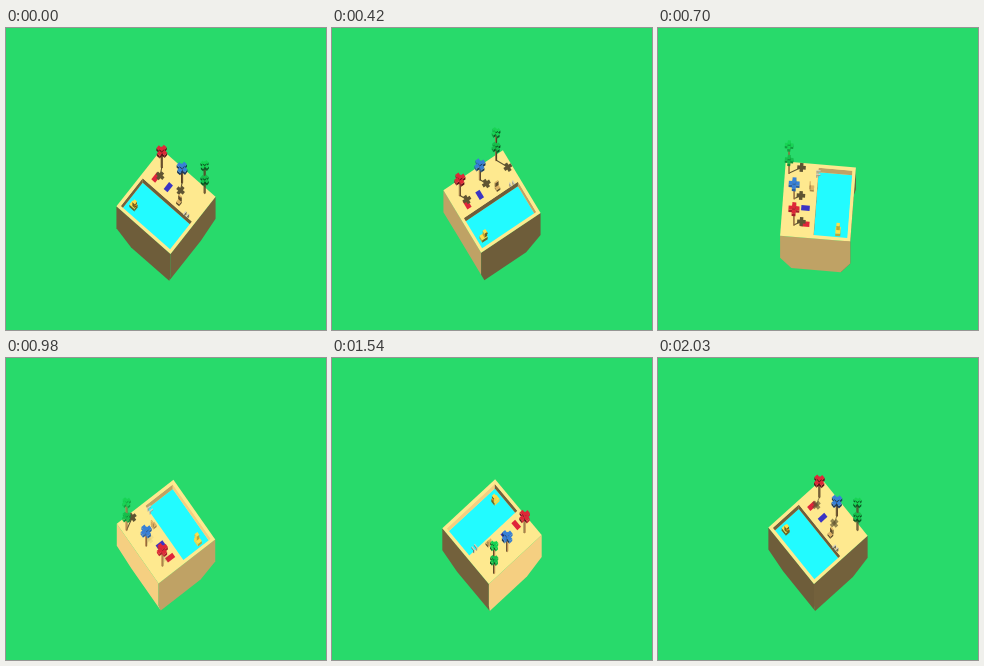
Recreate the animation shown at these times as an HTML page with a canvas. Size 320 px wide and 302 px high, loop 2100 ms.

```html
<!DOCTYPE html>
<html lang="en">
<head>
<meta charset="utf-8">
<title>Pool island</title>
<style>
html, body { margin: 0; width: 100%; height: 100%; overflow: hidden; background: #28da6b; }
canvas { display: block; }
</style>
</head>
<body>
<canvas id="stage" width="320" height="302"></canvas>
<script>
const ctx = document.getElementById('stage').getContext('2d');
const LOOP = 2100, STEP = 70, TILT = 1.055;
const TOP = '#fee98f', SAND = [255, 216, 134], WOOD = [196, 142, 80], SHADOW = '#5f5432';

// time in ms, turn in degrees
const TURN = [[0, -129.8], [420, -57.6], [700, -4.6], [980, 36.4],
  [1260, 84.9], [1540, 131.4], [2030, 220.4], [2100, 230.2]];

// Sides of a block: outward normal and fixed light level
const SIDES = [
  { n: [0, -1], light: 0.45 },
  { n: [1, 0], light: 0.43 },
  { n: [0, 1], light: 0.75 },
  { n: [-1, 0], light: 0.96 }
];
const CORNERS = [[-1, -1], [1, -1], [1, 1], [-1, 1]];
const POOL = { u0: -2, u1: 32, v0: -32, v1: 32, deep: 4.5 };

let angle = 0, cos = 1, sin = 0;

function turnAt(t) {
  const i = TURN.findIndex((k, n) => n > 0 && t <= k[0]);
  const [t0, a0] = TURN[i - 1], [t1, a1] = TURN[i];
  return a0 + (a1 - a0) * (t - t0) / (t1 - t0);
}

const depth = (u, v) => v * cos - u * sin;
const project = ([u, v, h = 0]) =>
  [160 + u * cos + v * sin, 173.6 + TILT * depth(u, v) - h];
const tint = (rgb, light) => `rgb(${rgb.map(c => Math.round(c * light)).join()})`;

function trace(points) {
  ctx.beginPath();
  points.forEach(p => ctx.lineTo(...project(p)));
  ctx.closePath();
}

function poly(points, fill) {
  trace(points);
  ctx.fillStyle = fill;
  ctx.fill();
}

const rect = (u, v, w, d, h = 0) =>
  CORNERS.map(([a, b]) => [u + a * w / 2, v + b * d / 2, h]);

function box({ u, v, h, w, d, t, rgb }) {
  const low = rect(u, v, w, d, h), high = rect(u, v, w, d, h + t);
  SIDES.forEach(({ n, light }, i) => {
    if (depth(...n) <= 0) return;
    const j = (i + 1) % 4;
    poly([high[i], high[j], low[j], low[i]], tint(rgb, light));
  });
  poly(high, tint(rgb, 1));
}

// Island body: a straight block with a tapered foot
function drawBody() {
  const top = rect(0, 0, 70.4, 70.4);
  const waist = rect(0, 0, 70.4, 70.4, -22);
  const foot = rect(0, 0, 49.5, 49.5, -42.5);
  SIDES
    .map((side, i) => ({ ...side, i, near: depth(...side.n) }))
    .filter(side => side.near > 0)
    .sort((a, b) => a.near - b.near)
    .forEach(({ i, light }) => {
      const j = (i + 1) % 4;
      poly([top[i], top[j], waist[j], foot[j], foot[i], waist[i]], tint(SAND, light));
    });
  poly(top, TOP);
}

function drawPool() {
  const { u0, u1, v0, v1, deep } = POOL;
  const rim = [[u0, v0], [u1, v0], [u1, v1], [u0, v1]];
  ctx.save();
  trace(rim);
  ctx.clip();
  poly(rim.map(p => [...p, -deep]), '#22fbff');
  SIDES.forEach(({ n }, i) => {
    if (depth(...n) >= 0) return;
    const a = rim[i], b = rim[(i + 1) % 4];
    poly([a, b, [...b, -deep], [...a, -deep]], tint(SAND, SIDES[(i + 2) % 4].light));
  });
  ctx.restore();
}

// shade: turn offset, in degrees, at which the shadow is strongest
const PALMS = [
  { u: -22.2, v: 24, tall: 17, rgb: [222, 40, 56], spread: 3.5, shade: 60 },
  { u: -24, v: -0.9, tall: 15.5, rgb: [56, 128, 214], spread: 3.5, shade: 60 },
  { u: -31, v: -24.5, tall: 28.5, rgb: [24, 212, 84], spread: 2.7, shade: 30, low: 14 }
];

function crown(u, v, h, rgb, r) {
  const leaf = (x, y, drop, size) =>
    ({ u: u + x, v: v + y, h: h - drop, w: size, d: size, t: 2.4, rgb });
  return [leaf(0, 0, 1, r), ...SIDES.map(({ n }) => leaf(n[0] * r, n[1] * r, 2.4, r * 1.1))];
}

function palmParts({ u, v, tall, rgb, spread, low }) {
  return [
    { u, v, h: 0, w: 1.5, d: 1.5, t: tall - 1, rgb: WOOD },
    ...crown(u, v, tall, rgb, spread),
    ...(low ? crown(u, v, low, rgb.map(c => c * 0.9), spread) : [])
  ];
}

function palmShadow({ u, v, tall, shade }) {
  const su = u + tall * 0.42, sv = v - tall * 0.225;
  const strength = 2 * Math.cos(angle + shade * Math.PI / 180) + 0.3;
  ctx.globalAlpha = Math.min(1, Math.max(0, strength));
  poly([[u, v - 0.6], [su, sv - 0.6], [su, sv + 0.6], [u, v + 0.6]], SHADOW);
  poly(rect(su, sv, 8.5, 3.4), SHADOW);
  poly(rect(su, sv, 3.4, 8.5), SHADOW);
  ctx.globalAlpha = 1;
}

const YELLOW = [255, 222, 74], STEEL = [214, 210, 190], SEAT = [222, 178, 100];
const PARTS = [
  ...PALMS.flatMap(palmParts),
  // duck
  { u: 22, v: 24, h: -4, w: 5, d: 6.5, t: 2.5, rgb: YELLOW },
  { u: 22, v: 22.4, h: -1.5, w: 3.4, d: 3.2, t: 4, rgb: YELLOW },
  { u: 22, v: 20.4, h: -0.5, w: 2, d: 1.2, t: 1, rgb: [240, 150, 40] },
  // chair
  { u: -7, v: -11, h: 0, w: 4, d: 4, t: 2, rgb: SEAT },
  { u: -8.8, v: -11, h: 2, w: 1.2, d: 4, t: 4, rgb: SEAT },
  // ladder
  ...[-26.5, -23].flatMap(v => [
    { u: -3, v, h: 0, w: 1.2, d: 1.2, t: 2.5, rgb: STEEL },
    { u: -1.5, v, h: 2, w: 4, d: 1.2, t: 1, rgb: STEEL }
  ])
];

function draw(t) {
  angle = turnAt(t) * Math.PI / 180;
  cos = Math.cos(angle);
  sin = Math.sin(angle);
  ctx.fillStyle = '#28da6b';
  ctx.fillRect(0, 0, 320, 302);
  drawBody();
  poly(rect(-11.3, 22.3, 9, 5), '#e0243a');
  poly(rect(-12, 7, 8.5, 5), '#3a34c4');
  PALMS.forEach(palmShadow);
  drawPool();
  const near = p => depth(p.u, p.v) + p.h;
  [...PARTS].sort((a, b) => near(a) - near(b)).forEach(box);
}

function tick() {
  draw(Math.floor(performance.now() % LOOP / STEP) * STEP);
  requestAnimationFrame(tick);
}
tick();
</script>
</body>
</html>
```
